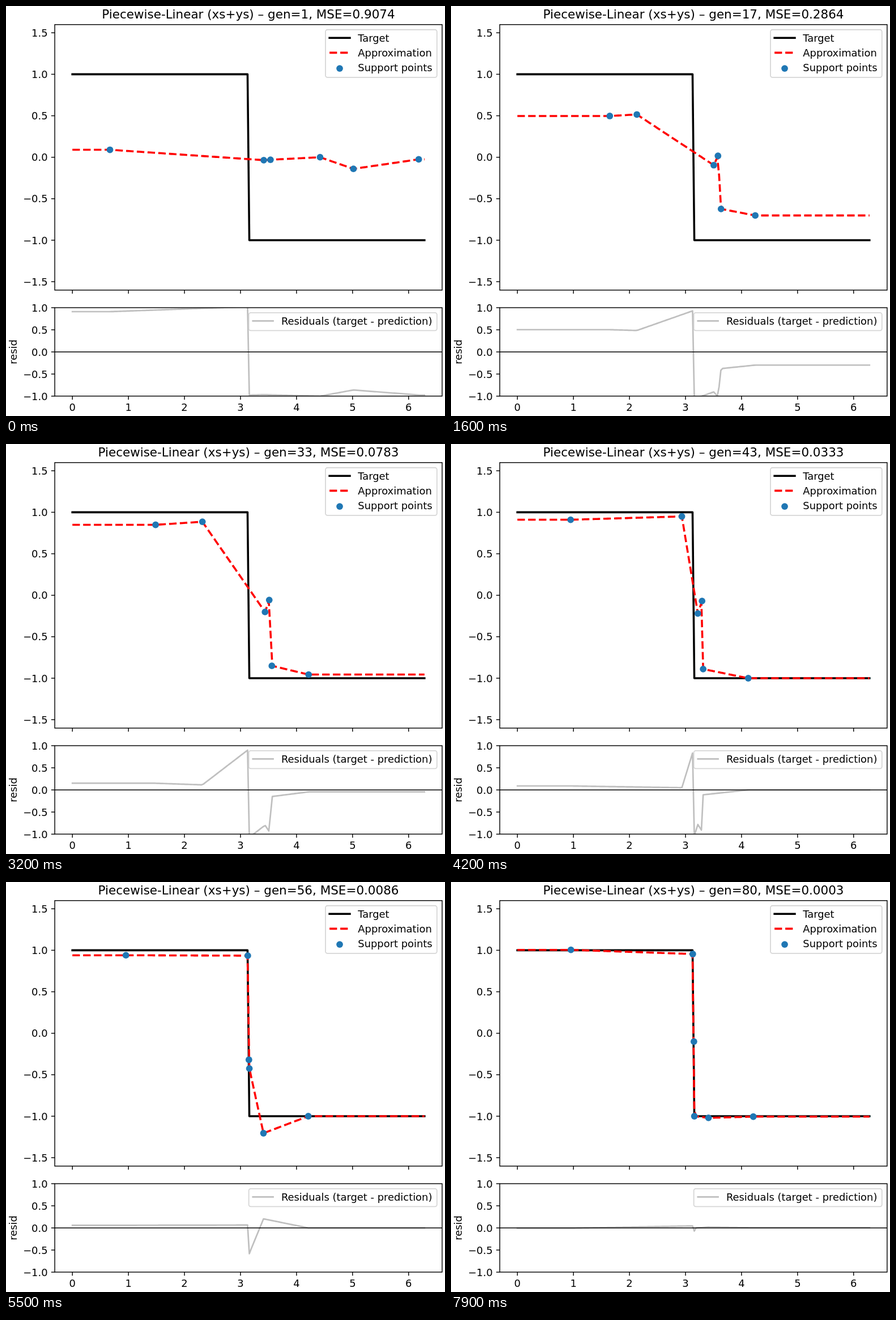
Animation, 775 px wide and 723 px high, one loop 8000 ms. Source, as an HTML page with a canvas:

```html
<!DOCTYPE html>
<html lang="en">
<head>
<meta charset="utf-8">
<title>Piecewise-linear fit</title>
<style>
html, body { margin: 0; width: 100%; height: 100%; overflow: hidden; background: #fff; }
canvas { display: block; }
</style>
</head>
<body>
<canvas id="stage" width="775" height="723"></canvas>
<script>
const ctx = document.getElementById('stage').getContext('2d');
const PT = 1.79;                 // pixels per point
const EM = 10 * PT;
const FONT = '"DejaVu Sans", sans-serif';
const LEFT = 86.1, RIGHT = 769.9;
const MAIN = { top: 32.8, bottom: 501, zero: 266.7, unit: 146.3 };
const RESID = { top: 532, bottom: 687.9, zero: 610, unit: 78 };
const SAMPLES = 200, STEP = 100, GENS = 80;
const BLUE = '#1f77b4', GREY = 'rgba(128,128,128,0.5)';

const linear = u => u;
const easeIn = u => u ** 4;
const easeOut = u => 1 - (1 - u) ** 2;
const mix = (a, b, u) => a + (b - a) * u;

// Key poses of the six support points; the eases lead to the next pose.
const settled = [0.955, 3.13, 3.15, 3.158, 3.41, 4.21];
const poses = [
  { gen: 1, x: [0.67, 3.415, 3.535, 4.42, 5.015, 6.18], y: [0.09, -0.035, -0.03, 0, -0.14, -0.025], easeX: linear, easeY: linear },
  { gen: 10, x: [1.65, 2.13, 3.505, 3.58, 3.635, 4.245], y: [0.245, 0.25, -0.02, 0.07, -0.46, -0.52], easeX: easeIn, easeY: easeOut },
  { gen: 43, x: [0.95, 2.935, 3.22, 3.295, 3.315, 4.12], y: [0.91, 0.95, -0.22, -0.07, -0.89, -1], easeX: linear, easeY: linear },
  { gen: 56, x: settled, y: [0.94, 0.935, -0.32, -0.425, -1.205, -1], easeX: linear, easeY: easeOut },
  { gen: 80, x: settled, y: [1.005, 0.955, -0.1, -1, -1.02, -1.005] }
];
// [generation, error], joined on a log scale
const errors = [[1, 0.9074], [10, 0.4857], [24, 0.1689], [43, 0.0333], [56, 0.0086], [65, 0.0019], [80, 0.0003]];

const px = x => 117.2 + 98.93 * x;
const py = (ax, y) => ax.zero - ax.unit * y;
const grid = Array.from({ length: SAMPLES }, (_, i) => 2 * Math.PI * i / (SAMPLES - 1));
const target = x => x < Math.PI ? 1 : -1;

// Index of the segment that holds v, and the progress through it.
function locate(stops, v) {
  let i = 0;
  while (i < stops.length - 2 && v >= stops[i + 1]) i++;
  return [i, (v - stops[i]) / (stops[i + 1] - stops[i])];
}

function pointsAt(gen) {
  const [i, u] = locate(poses.map(p => p.gen), gen);
  const a = poses[i], b = poses[i + 1];
  return a.x.map((x, k) => [mix(x, b.x[k], a.easeX(u)), mix(a.y[k], b.y[k], a.easeY(u))]);
}

function errorAt(gen) {
  const [i, u] = locate(errors.map(e => e[0]), gen);
  const a = errors[i][1], b = errors[i + 1][1];
  return a * (b / a) ** u;
}

function fitAt(points, x) {
  const [i, u] = locate(points.map(p => p[0]), x);
  return mix(points[i][1], points[i + 1][1], Math.min(1, Math.max(0, u)));
}

function stroke(pts, color, width, { dash = [], cap = 'butt' } = {}) {
  ctx.beginPath();
  pts.forEach(([x, y]) => ctx.lineTo(x, y));
  ctx.strokeStyle = color;
  ctx.lineWidth = width * PT;
  ctx.lineCap = cap;
  ctx.lineJoin = 'round';
  ctx.setLineDash(dash.map(d => d * width * PT));
  ctx.stroke();
  ctx.setLineDash([]);
}

const targetStyle = pts => stroke(pts, '#000', 2, { cap: 'square' });
const fitStyle = pts => stroke(pts, '#f00', 2, { dash: [3.7, 1.6] });
const residStyle = pts => stroke(pts, GREY, 1.5, { cap: 'square' });

function dot(x, y) {
  ctx.beginPath();
  ctx.arc(x, y, 5.9, 0, 2 * Math.PI);
  ctx.fillStyle = BLUE;
  ctx.fill();
}

function text(str, x, y, align = 'left', size = 10) {
  ctx.font = `${size * PT}px ${FONT}`;
  ctx.textAlign = align;
  ctx.fillStyle = '#000';
  ctx.fillText(str, x, y);
}

function clipped(ax, draw) {
  ctx.save();
  ctx.beginPath();
  ctx.rect(LEFT, ax.top, RIGHT - LEFT, ax.bottom - ax.top);
  ctx.clip();
  draw();
  ctx.restore();
}

function frame(ax, limit, labelled) {
  const tick = 3.5 * PT;
  for (let x = 0; x <= 6; x++) {
    stroke([[px(x), ax.bottom], [px(x), ax.bottom + tick]], '#000', 0.8);
    if (labelled) text(String(x), px(x), 714.2, 'center');
  }
  for (let v = -limit; v <= limit; v += 0.5) {
    const y = py(ax, v);
    stroke([[LEFT - tick, y], [LEFT, y]], '#000', 0.8);
    text(v.toFixed(1).replace('-', '\u2212'), LEFT - 2 * tick, y + 6.5, 'right');
  }
  ctx.strokeStyle = '#000';
  ctx.lineWidth = 0.8 * PT;
  ctx.lineJoin = 'miter';
  ctx.strokeRect(LEFT, ax.top, RIGHT - LEFT, ax.bottom - ax.top);
}

// Each row is [label, draw], where draw gets the ends and height of its key.
function legend(ax, x, w, h, rows) {
  const top = ax.top + EM / 2;
  ctx.beginPath();
  ctx.roundRect(x, top, w, h, EM / 5);
  ctx.fillStyle = 'rgba(255,255,255,0.8)';
  ctx.fill();
  ctx.strokeStyle = 'rgba(204,204,204,0.8)';
  ctx.lineWidth = PT;
  ctx.stroke();
  const start = x + 0.4 * EM;
  rows.forEach(([label, draw], i) => {
    const base = top + 1.16 * EM + 26.1 * i;
    draw(start, start + 2 * EM, base - 0.35 * EM);
    text(label, start + 2.8 * EM, base);
  });
}

const lineKey = style => (a, b, y) => style([[a, y], [b, y]]);

function drawMain(points) {
  clipped(MAIN, () => {
    targetStyle(grid.map(x => [px(x), py(MAIN, target(x))]));
    fitStyle(grid.map(x => [px(x), py(MAIN, fitAt(points, x))]));
    points.forEach(([x, y]) => dot(px(x), py(MAIN, y)));
  });
  frame(MAIN, 1.5, false);
  legend(MAIN, 564, 196.8, 84.2, [
    ['Target', lineKey(targetStyle)],
    ['Approximation', lineKey(fitStyle)],
    ['Support points', (a, b, y) => dot((a + b) / 2, y + 1.6)]
  ]);
}

function drawResid(points) {
  clipped(RESID, () => {
    residStyle(grid.map(x => [px(x), py(RESID, target(x) - fitAt(points, x))]));
    stroke([[LEFT, RESID.zero], [RIGHT, RESID.zero]], '#000', 0.8);
  });
  frame(RESID, 1, true);
  legend(RESID, 428.6, 332.2, 31.4, [['Residuals (target - prediction)', lineKey(residStyle)]]);
  ctx.save();
  ctx.translate(18.7, RESID.zero);
  ctx.rotate(-Math.PI / 2);
  text('resid', 0, 0, 'center');
  ctx.restore();
}

function render(now) {
  const gen = 1 + Math.floor(now / STEP) % GENS;
  const points = pointsAt(gen);
  ctx.fillStyle = '#fff';
  ctx.fillRect(0, 0, 775, 723);
  drawMain(points);
  drawResid(points);
  text(`Piecewise-Linear (xs+ys) \u2013 gen=${gen}, MSE=${errorAt(gen).toFixed(4)}`, 428, 22.2, 'center', 12);
}

const start = performance.now();
function loop() {
  render(performance.now() - start);
  requestAnimationFrame(loop);
}
loop();
</script>
</body>
</html>
```
